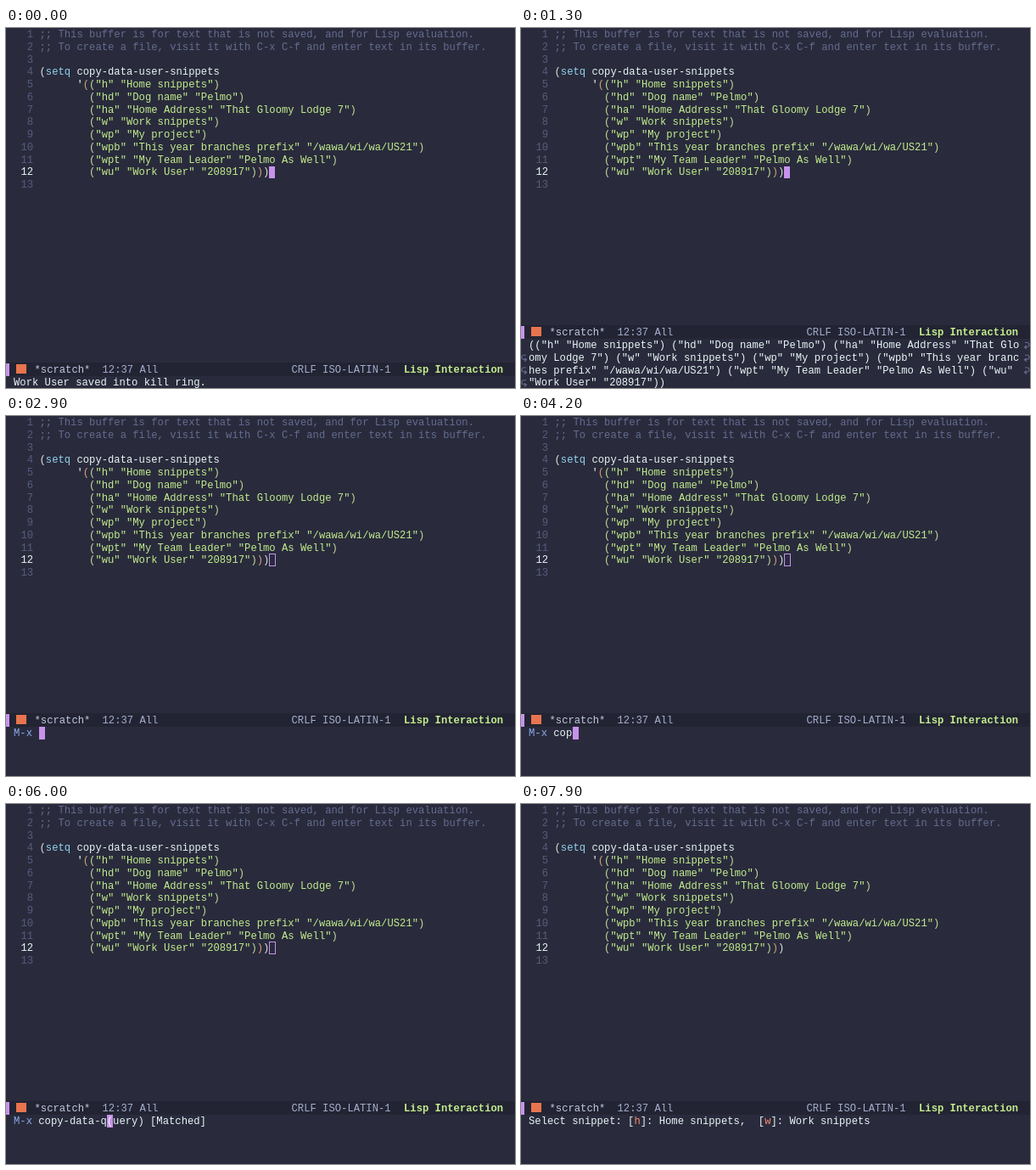
An HTML page with a canvas for the animation above (8 s loop, 600x424 px).

```html
<!DOCTYPE html>
<html lang="en">
<head>
<meta charset="utf-8">
<title>Snippet buffer</title>
<style>
html, body { margin: 0; width: 100%; height: 100%; overflow: hidden; background: #292b3c; }
canvas { display: block; width: 600px; height: 424px; }
</style>
</head>
<body>
<canvas id="stage" width="600" height="424"></canvas>
<script>
const ctx = document.getElementById('stage').getContext('2d');
const LOOP = 8000, CW = 7.32, LH = 14.75, LEFT = 39.5, WRAP = 79;
const FONT = '12.2px "Liberation Mono", "Courier New", monospace';
const C = {
  bg: '#292b3c', bar: '#232433', fg: '#e9f6f6', dim: '#656b90', num: '#565b7c',
  green: '#c3ec8d', purple: '#c792ea', orange: '#f78c6c', blue: '#8ea9ee',
  gray: '#a3aecf', match: '#b3dfe8', cyan: '#92d4ee',
  paren: ['#e3e6e0', '#d8a07c', '#c5dc9a']
};

const snippets = [
  ['h', 'Home snippets'],
  ['hd', 'Dog name', 'Pelmo'],
  ['ha', 'Home Address', 'That Gloomy Lodge 7'],
  ['w', 'Work snippets'],
  ['wp', 'My project'],
  ['wpb', 'This year branches prefix', '/wawa/wi/wa/US21'],
  ['wpt', 'My Team Leader', 'Pelmo As Well'],
  ['wu', 'Work User', '208917']
];
const forms = snippets.map(s => '(' + s.map(v => `"${v}"`).join(' ') + ')');
const code = [
  ';; This buffer is for text that is not saved, and for Lisp evaluation.',
  ';; To create a file, visit it with C-x C-f and enter text in its buffer.',
  '',
  '(setq copy-data-user-snippets',
  ...forms.map((f, i) => (i ? ' '.repeat(8) : "      '(") + f)
];
code[code.length - 1] += '))';
code.push('');
const printed = '(' + forms.join(' ') + ')';

function rect(x, y, w, h, color) {
  ctx.fillStyle = color;
  ctx.fillRect(x, y, w, h);
}

// Characters sit on a fixed terminal grid; y is the top of the row.
function put(text, x, y, color, bold) {
  ctx.font = (bold ? 'bold ' : '') + FONT;
  ctx.fillStyle = color;
  [...text].forEach((ch, i) => {
    if (ch !== ' ') ctx.fillText(ch, x + i * CW, y + 11);
  });
}

function drawCode() {
  let depth = 0;
  code.forEach((line, i) => {
    const y = i * LH, n = String(i + 1);
    put(n, LEFT - (n.length + 1) * CW, y, i === 11 ? C.fg : C.num);
    if (line.startsWith(';')) return put(line, LEFT, y, C.dim);
    for (const m of line.matchAll(/"[^"]*"|[()]|[^"()\s]+/g)) {
      const t = m[0];
      let color = C.fg;
      if (t[0] === '"') color = C.green;
      else if (t === '(') color = C.paren[depth++];
      else if (t === ')') color = C.paren[--depth];
      else if (t === 'setq') color = C.cyan;
      put(t, LEFT + m.index * CW, y, color);
    }
  });
}

function drawCursor(mode) {
  if (mode === 'solid') rect(310, 163, 7, 14, C.purple);
  if (mode === 'hollow') {
    ctx.strokeStyle = C.purple;
    ctx.lineWidth = 1;
    ctx.strokeRect(310.5, 162.5, 7, 14);
  }
}

function drawModeLine(top) {
  rect(0, top, 600, 16, C.bar);
  rect(0, top + 1, 4, 15, C.purple);
  rect(12, top + 2, 12, 11, '#e8744f');
  const y = top + 1.25;
  put('*scratch*', 33.5, y, '#c0c9e2');
  put('12:37 All', 113.5, y, C.gray);
  put('CRLF ISO-LATIN-1', 336.5, y, C.gray);
  put('Lisp Interaction', 469, y, C.green, true);
}

// Small hooked arrow in the fringe of a wrapped row.
function wrapMark(x, y, dir) {
  ctx.save();
  ctx.translate(x, y + 7.5);
  ctx.scale(dir, 1);
  ctx.strokeStyle = C.dim;
  ctx.lineWidth = 1.1;
  ctx.beginPath();
  ctx.moveTo(-2, -3);
  ctx.lineTo(1, -3);
  ctx.quadraticCurveTo(3, -3, 3, 0);
  ctx.quadraticCurveTo(3, 2.5, -2, 2.5);
  ctx.moveTo(0, 0.3);
  ctx.lineTo(-2.5, 2.5);
  ctx.lineTo(0, 4.5);
  ctx.stroke();
  ctx.restore();
}

// Each part is [text, color, bold]; rows wrap at the window edge.
function drawEcho(parts, top, cursor = -1) {
  let col = 0;
  const at = i => [9 + (i % WRAP) * CW, top + Math.floor(i / WRAP) * LH];
  if (cursor >= 0) {
    const [x, y] = at(cursor);
    rect(Math.round(x + 0.5), y, 7, 15, C.purple);
  }
  for (const [text, color = C.fg, bold] of parts)
    for (const ch of text) put(ch, ...at(col++), color, bold);
  for (let r = 1; r < Math.ceil(col / WRAP); r++) {
    wrapMark(596, top + (r - 1) * LH, 1);
    wrapMark(4, top + r * LH, -1);
  }
}

function typed(t) {
  const keys = [
    [3800, 'c'], [4000, 'co'], [4200, 'cop'], [4300, 'copy'], [4400, 'copy-'],
    [4700, 'copy-d'], [5500, 'copy-da'], [5600, 'copy-dat'], [5700, 'copy-data'],
    [5800, 'copy-data-'], [5900, 'copy-data-q']
  ];
  return keys.reduce((s, [at, text]) => t >= at ? text : s, '');
}

function candidates(t) {
  if (t < 4400) return [];
  if (t >= 5900) return [['(uery) [Matched]']];
  const parts = [['{'], ['copy-data-mode', C.fg, true], [' | ']];
  if (t >= 5500) return [...parts, ['copy-data-', C.match], ['query}']];
  return [
    ...parts,
    ['copy-', C.match], ['d'], ['irectory', C.match], [' | '],
    ['copy-', C.match], ['d'], ['ata-query', C.match], [' | '],
    ['copy-from-above-command', C.match], [' | '],
    ['Info-copy-current-node-name'], [' | …}']
  ];
}

function draw(t) {
  rect(0, 0, 600, 424, C.bg);
  const tall = t >= 500, top = tall ? 366 : 410;
  drawCursor(t < 2800 ? 'solid' : t < 6700 ? 'hollow' : 'none');
  drawCode();
  drawModeLine(top - 16);
  if (!tall) drawEcho([['Work User saved into kill ring.']], top);
  else if (t < 2800) drawEcho([[printed]], top);
  else if (t < 6700) {
    const input = typed(t);
    drawEcho([['M-x ', C.blue], [input], ...candidates(t)], top, 4 + input.length);
  } else {
    drawEcho([
      ['Select snippet: ['], ['h', C.orange], [']: Home snippets,  ['],
      ['w', C.orange], [']: Work snippets']
    ], top);
  }
}

const start = performance.now();
function frame() {
  draw((performance.now() - start) % LOOP);
  requestAnimationFrame(frame);
}
frame();
</script>
</body>
</html>
```
